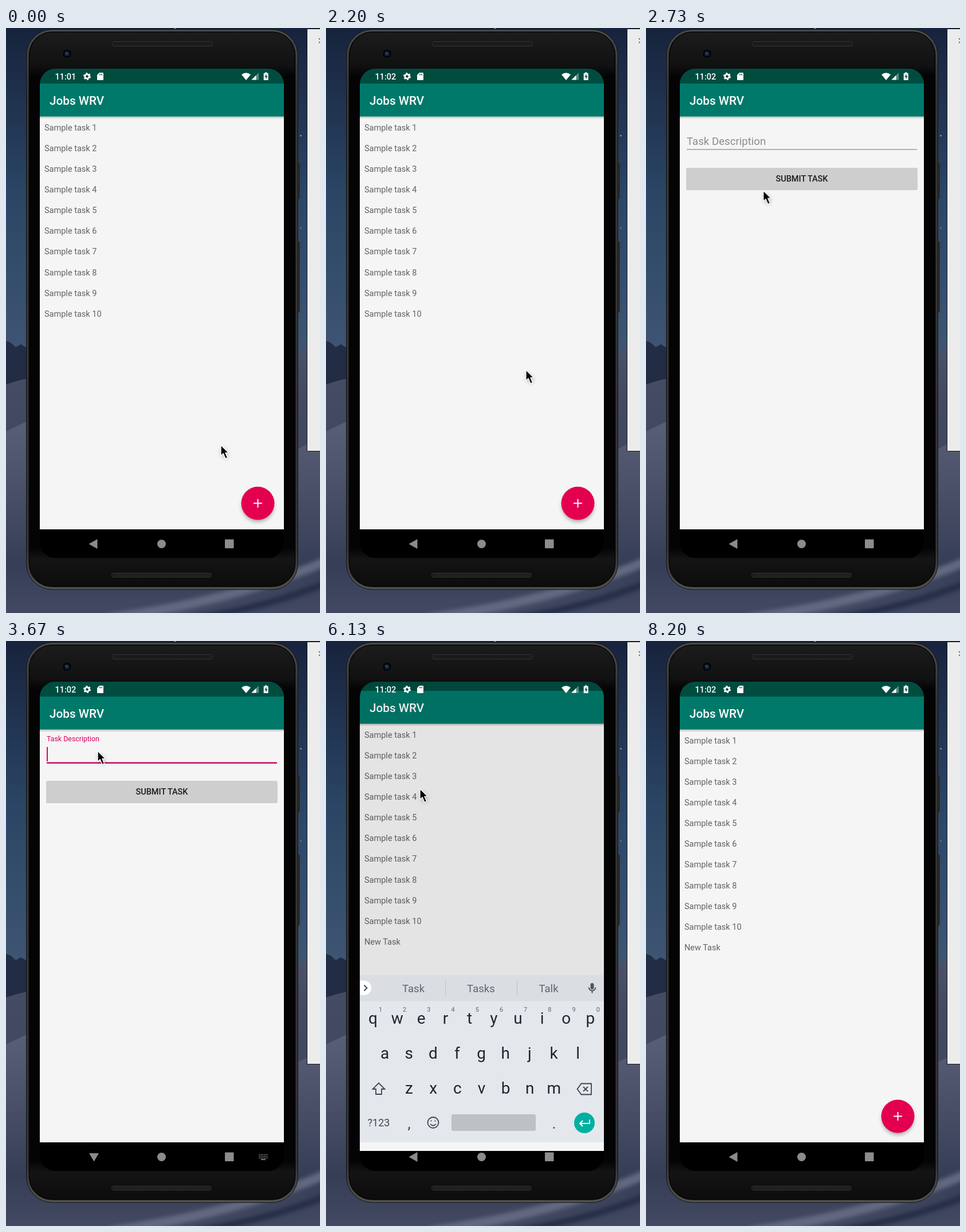
An HTML page for the animation above (8.54 s loop, 548 by 1021 pixels).

```html
<!DOCTYPE html>
<html lang="en">
<head>
<meta charset="utf-8">
<title>Task list demo</title>
<style>
  html, body { margin: 0; width: 100%; height: 100%; overflow: hidden; background: #26324f; }
  .stage { position: relative; width: 548px; height: 1021px; overflow: hidden; font-family: Roboto, sans-serif; }
  .layer, .stage svg { position: absolute; left: 0; top: 0; width: 548px; height: 1021px; }
  .screen { clip-path: inset(71px 63px 96px 59px round 27px); background: #000; }
  .above-nav { clip-path: inset(0 0 146px 0); }
  .medium { font-weight: 500; }
  .mid { text-anchor: middle; }
  .icon { fill: none; stroke: #3c474d; stroke-width: 1.8; }

  .anim { animation: 8540ms linear infinite; }
  .cursor { animation-name: cursor; }
  .list { animation-name: list; animation-timing-function: step-end; }
  .dim { animation-name: dim; animation-timing-function: step-end; }
  .form { animation-name: form; animation-timing-function: step-end; }
  .keyboard { animation-name: keyboard; }
  .ime-on { animation-name: ime-on; animation-timing-function: step-end; }
  .ime-off { animation-name: ime-off; animation-timing-function: step-end; }
  .label { animation-name: label; }
  .focus { animation-name: focus; }
  .press { animation-name: press; }
  .tap { animation-name: tap; }

  @keyframes cursor {
    0%, 8.548% { transform: translate(375px, 728px); animation-timing-function: ease-in-out; }
    15.574%, 20.492% { transform: translate(438px, 813px); animation-timing-function: ease-in; }
    27.283%, 28.091% { transform: translate(303px, 485.5px); animation-timing-function: ease-out; }
    35.83%, 60.07% { transform: translate(160px, 192px); animation-timing-function: ease-in-out; }
    64.754%, 81.967% { transform: translate(164px, 258px); opacity: 1; animation-timing-function: ease-in; }
    87.46% { transform: translate(479px, 72px); opacity: 1; }
    87.47%, 100% { transform: translate(479px, 72px); opacity: 0; }
  }
  @keyframes list {
    0% { transform: none; }
    27.283% { transform: translateY(-7.3px); }
    28.103% { transform: translateY(-15px); }
    28.923% { transform: translateY(-17px); }
    71.78% { transform: translateY(-10px); }
    72.6% { transform: translateY(-3px); }
    73.42% { transform: translateY(-1px); }
    74.24%, 100% { transform: none; }
  }
  @keyframes dim {
    0% { opacity: 0; }
    27.283% { opacity: .12; }
    71.78% { opacity: .07; }
    72.6%, 100% { opacity: 0; }
  }
  @keyframes form {
    0% { transform: translateY(35px); clip-path: inset(1021px 0 0 0); }
    27.283% { transform: translateY(20px); clip-path: inset(184px 0 0 0); }
    28.103% { transform: translateY(4.5px); clip-path: inset(76px 0 0 0); }
    28.923% { transform: translateY(1.5px); clip-path: inset(0 0 0 0); }
    30% { transform: none; clip-path: inset(0 0 0 0); }
    71.78% { transform: translateY(15px); clip-path: inset(640px 0 0 0); }
    72.6%, 100% { transform: translateY(35px); clip-path: inset(1021px 0 0 0); }
  }
  @keyframes keyboard {
    0%, 43.677% { transform: translateY(29px); opacity: 0; animation-timing-function: ease-out; }
    46.25%, 71.78% { transform: none; opacity: 1; animation-timing-function: ease-in; }
    73.536%, 100% { transform: translateY(29px); opacity: 0; }
  }
  @keyframes ime-on { 0% { opacity: 0; } 41.33% { opacity: 1; } 71.78%, 100% { opacity: 0; } }
  @keyframes ime-off { 0% { opacity: 1; } 41.33% { opacity: 0; } 71.78%, 100% { opacity: 1; } }
  @keyframes label {
    0%, 39% { transform: translate(71px, 203.5px) scale(1); fill: #8c8c8c; animation-timing-function: ease-out; }
    41%, 100% { transform: translate(71px, 174.5px) scale(.665); fill: #dc0066; }
  }
  @keyframes focus { 0%, 39% { opacity: 0; } 41%, 100% { opacity: 1; } }
  @keyframes press { 0%, 66.3% { opacity: 0; } 68% { opacity: .13; } 71%, 100% { opacity: 0; } }
  @keyframes tap { 0%, 18.5% { opacity: 0; } 20% { opacity: .18; } 23.5%, 100% { opacity: 0; } }
</style>
</head>
<body>
<div class="stage">
  <!-- wallpaper, side window and phone body -->
  <svg viewBox="0 0 548 1021">
    <defs>
      <linearGradient id="sky" x2="0" y2="1">
        <stop offset="0" stop-color="#17233d"/><stop offset=".45" stop-color="#2b4565"/>
        <stop offset="1" stop-color="#435a76"/>
      </linearGradient>
      <linearGradient id="dune" x2="0" y2="1">
        <stop offset="0" stop-color="#4a5269"/><stop offset=".2" stop-color="#434a61"/>
        <stop offset="1" stop-color="#3a4159"/>
      </linearGradient>
      <linearGradient id="ridge" x2="0" y2="1">
        <stop offset="0" stop-color="#5a6078"/><stop offset=".35" stop-color="#4b5168"/>
        <stop offset=".75" stop-color="#363e57"/><stop offset="1" stop-color="#424961"/>
      </linearGradient>
      <linearGradient id="rim" x2="0" y2="1">
        <stop offset="0" stop-color="#4b4b4a"/><stop offset=".1" stop-color="#2e2f2e"/>
        <stop offset=".93" stop-color="#2a2b2b"/><stop offset="1" stop-color="#555654"/>
      </linearGradient>
      <linearGradient id="body" x2="0" y2="1">
        <stop offset="0" stop-color="#1c1c1c"/><stop offset=".06" stop-color="#111"/>
        <stop offset=".08" stop-color="#040404"/><stop offset=".93" stop-color="#040404"/>
        <stop offset=".95" stop-color="#141414"/><stop offset="1" stop-color="#0c0c0c"/>
      </linearGradient>
      <linearGradient id="shade" x2="0" y2="1">
        <stop offset="0" stop-opacity=".22"/><stop offset="1" stop-opacity="0"/>
      </linearGradient>
      <filter id="soft" x="-50%" y="-50%" width="200%" height="200%"><feGaussianBlur stdDeviation="3.5"/></filter>
      <symbol id="chrome" viewBox="0 0 548 1021">
        <path fill="#f5f5f5" d="M59 71h426v804H59z"/>
        <path fill="#004d40" d="M59 71h426v26.5H59z"/>
        <path fill="#00796b" d="M59 97h426v57.5H59z"/>
        <path fill="url(#shade)" d="M59 154.5h426v4.5H59z"/>
        <text class="medium" x="76" y="133.5" font-size="20.7" fill="#fff">Jobs WRV</text>
      </symbol>
    </defs>
    <path fill="url(#sky)" d="M0 0h548v640H0z"/>
    <path fill="#222c45" d="M0 546l8 3 9 8 9-5 10 6 14 8v60H0z"/>
    <path fill="url(#dune)" d="M0 622Q30 612 60 608L505 568Q520 555 548 545V1021H0z"/>
    <path fill="url(#ridge)" d="M0 704Q30 690 60 675L500 740 548 715V1021H0z"/>
    <g fill="none" filter="url(#soft)">
      <path stroke="#626980" stroke-width="16" d="M180 1030Q400 1000 560 930"/>
      <path stroke="#272e46" stroke-width="12" d="M330 1030Q460 1010 560 968"/>
    </g>
    <g fill="#dfe5f0"><circle cx="514.5" cy="188" r="1"/><circle cx="514.5" cy="349" r=".7"/><circle cx="295" cy="0" r="1.2"/></g>

    <path fill="#ececec" stroke="#171a20" d="M525.5 1.5h26v737h-26z"/>
    <path fill="none" stroke="#555" stroke-width="1.3" d="M546 18l8 8m-8 0l8-8"/>

    <g fill="#333" stroke="#191919">
      <rect x="507" y="236" width="5" height="62" rx="1.5"/>
      <rect x="507" y="373" width="5" height="123" rx="1.5"/>
    </g>
    <rect x="35.7" y="2.500" width="473.600" height="977.500" rx="45" fill="url(#rim)" stroke="#121212"/>
    <rect x="37.7" y="4.500" width="469.600" height="973.500" rx="43" fill="none" stroke="#4a4a48" stroke-width=".8"/>
    <rect x="40.500" y="7" width="464" height="968" rx="40" fill="url(#body)" stroke="#060606" stroke-width="1.5"/>
    <g fill="#1b1b1b" stroke="#343434">
      <rect x="185" y="23.500" width="175.500" height="8" rx="3.500"/>
      <rect x="184.500" y="951.500" width="174" height="7" rx="3"/>
    </g>
    <path stroke="#2b2b2b" stroke-width="3" stroke-dasharray="1 1" d="M189 955h166"/>
    <circle cx="106.500" cy="45" r="8.500" fill="#060709" stroke="#202124"/>
    <circle cx="106.500" cy="45" r="4" fill="#17234a"/>
    <circle cx="105.500" cy="44" r="1.300" fill="#52658f"/>
  </svg>

  <div class="layer screen">
    <svg viewBox="0 0 548 1021" fill="#8c8c8c">
      <path class="anim ime-off" d="M159.500 892v17l-15-8.500z"/>
      <path class="anim ime-on" d="M145 894h17l-8.500 14.500z"/>
      <circle cx="271.500" cy="900.500" r="7.500"/>
      <rect x="382" y="892.500" width="15.500" height="15.500" rx="1"/>
      <g class="anim ime-on" fill="none" stroke="#8c8c8c" stroke-width="1.700">
        <path stroke-dasharray="1.700 1.200" d="M441.500 896.500h15.500M441.500 899.500h15.500M441.500 902.500h15.500"/>
        <path d="M445 905h8"/>
      </g>
    </svg>

    <div class="layer anim list">
      <svg viewBox="0 0 548 1021">
        <use href="#chrome" width="548" height="1021"/>
        <g id="rows" font-size="14.500" fill="#636363"></g>
        <circle cx="439.500" cy="834" r="27.500" opacity=".34" filter="url(#soft)"/>
        <circle cx="439.500" cy="829.500" r="29" fill="#e40050"/>
        <circle class="anim tap" cx="439.500" cy="829.500" r="29" fill="#fff"/>
        <path stroke="#fff" stroke-width="2" d="M432 829.500h15M439.500 822v15"/>
      </svg>
    </div>
    <svg class="anim dim" viewBox="0 0 548 1021"><path d="M59 71h426v804H59z"/></svg>

    <div class="layer anim form">
      <svg viewBox="0 0 548 1021">
        <use href="#chrome" width="548" height="1021"/>
        <text class="anim label" font-size="18.650">Task Description</text>
        <path fill="#707070" d="M71 211.500h402v1H71z"/>
        <path class="anim focus" fill="#e0006a" d="M71 211.800h402v2.200H71z"/>
        <text id="entry" x="71" y="204" font-size="18.650" fill="#1f1f1f" style="white-space:pre"><tspan id="done"></tspan><tspan id="word" style="text-decoration:underline 1px;text-underline-offset:3px"></tspan></text>
        <rect id="caret" y="185" width="2" height="25" fill="#e0006a"/>
        <rect x="70" y="245" width="404" height="38" rx="2" opacity=".16"/>
        <rect x="70.500" y="244" width="403" height="37" rx="2" fill="#cecece"/>
        <rect class="anim press" x="70.500" y="244" width="403" height="37" rx="2"/>
        <text class="medium mid" x="272" y="268" font-size="14.500" fill="#1c1c1c">SUBMIT TASK</text>
      </svg>
    </div>

    <div class="layer above-nav">
      <svg class="anim keyboard" viewBox="0 0 548 1021">
        <path fill="#e4e8ed" d="M59 583h426v292H59z"/>
        <path fill="#dadee3" d="M59 583h426v45.500H59z"/>
        <path fill="#fff" d="M59 592.500h7.500a12.700 12.700 0 0 1 0 25.400H59z"/>
        <path class="icon" stroke-width="2" d="M66.500 600.500l5 5-5 5"/>
        <path stroke="#bcc2c7" d="M208.500 593v26M333.500 593v26"/>
        <g id="hints" class="mid" font-size="18.600" fill="#5d676d"></g>
        <rect x="461.500" y="597" width="6" height="11" rx="3" fill="#4b565c"/>
        <path class="icon" stroke-width="1.600" d="M458.700 604.500a5.800 5.800 0 0 0 11.600 0M464.500 610.500v4"/>
        <g id="keys" class="mid" font-size="28" fill="#1d272c"></g>
        <g id="digits" class="mid" font-size="11" fill="#5d676d"></g>
        <path class="icon" d="M92 771.500l10.500 10.500h-5.500v9h-10v-9h-5.500z"/>
        <path class="icon" d="M438.500 782l7-9.500h17.500v19h-17.500zM449 778l8 8m0-8l-8 8"/>
        <g class="mid" fill="#3c474d">
          <text x="92" y="847" font-size="18">?123</text>
          <text x="145" y="851" font-size="26">,</text>
          <text x="398" y="851" font-size="26">.</text>
        </g>
        <circle class="icon" cx="187" cy="840.500" r="9.500"/>
        <path class="icon" d="M182 843q5 5.500 10 0M183.500 836.500v2M190.500 836.500v2"/>
        <rect x="219" y="826" width="147" height="29" rx="3" fill="#bdc1c6"/>
        <circle cx="451" cy="841" r="18" fill="#00b09f"/>
        <path fill="none" stroke="#fff" stroke-width="2" d="M460 835.500v6.500h-17m5-5l-5 5 5 5"/>
      </svg>
    </div>

    <svg viewBox="0 0 548 1021" fill="#fff">
      <text id="clock" class="medium" x="85.500" y="90" font-size="14.500">11:01</text>
      <g fill="none" stroke="#fff">
        <circle cx="141.500" cy="84.500" r="3.700" stroke-width="2.800"/>
        <circle cx="141.500" cy="84.500" r="5.500" stroke-width="2" stroke-dasharray="2.880 2.880"/>
      </g>
      <path d="M163 78h6q1 0 1 1v11q0 1-1 1h-9q-1 0-1-1v-8z"/>
      <path stroke="#004d40" d="M163.500 80v2.500M165.500 80v2.500M167.500 80v2.500"/>
      <path d="M411 81.300Q419 75 427 81.300L419 91z"/>
      <path opacity=".35" d="M441 78v12.500h-12.500z"/>
      <path d="M436.500 82.500v8h-8z"/>
      <path d="M451.700 77.500h4v1.500h2v12h-8v-12h2z"/>
      <path fill="#004d40" d="M454.500 80l-3 5.500h2v4l3-5.500h-2z"/>
    </svg>
  </div>

  <svg viewBox="0 0 548 1021">
    <g class="anim cursor">
      <path opacity=".3" filter="url(#soft)" d="M1 3v18l4-4 4 8 3-2-3-7h6z"/>
      <path stroke="#fff" stroke-width="1.300" stroke-linejoin="round" d="M0 0V18.500L4.200 14.700 8 23.500 11.600 22 7.900 13.300H13.400Z"/>
    </g>
  </svg>
</div>

<script>
  const LOOP = 8540;
  const ENTRY = "New Task";
  const FOCUS_AT = 3400, SUBMIT_AT = 6100, CLOCK_AT = 1930;
  const keyTimes = [4170, 4270, 4390, 4500, 4610, 4720, 4820, 4930];
  const byId = id => document.getElementById(id);

  function addText(parent, x, y, content) {
    const node = document.createElementNS("http://www.w3.org/2000/svg", "text");
    node.setAttribute("x", x);
    node.setAttribute("y", y);
    node.textContent = content;
    return byId(parent).appendChild(node);
  }

  for (let i = 0; i < 10; i++) addText("rows", 67, 178.6 + i * 36.13, `Sample task ${i + 1}`);
  const newRow = addText("rows", 67, 178.6 + 361.3, ENTRY);

  const keyRows = [["qwertyuiop", 82, 668], ["asdfghjkl", 102.5, 728.5], ["zxcvbnm", 145, 790]];
  for (const [letters, x, y] of keyRows)
    [...letters].forEach((letter, i) => addText("keys", x + i * 42.15, y, letter));
  [..."1234567890"].forEach((digit, i) => addText("digits", 95 + i * 42.2, 647, digit));
  const hints = [152.5, 270.5, 388.5].map(x => addText("hints", x, 612.5, ""));

  function suggestions(word) {
    if (!word) return ["I", "The", "This"];
    return word[0] === "N" ? ["New", "News", "Never"] : ["Task", "Tasks", "Talk"];
  }

  function setText(node, value) {
    if (node.textContent !== value) node.textContent = value;
  }

  function draw() {
    const t = performance.now() % LOOP;
    const count = keyTimes.filter(time => time <= t).length;
    const typed = ENTRY.slice(0, count);
    const split = typed.lastIndexOf(" ") + 1;
    const word = typed.slice(split);
    const lastEdit = count ? keyTimes[count - 1] : FOCUS_AT;

    setText(byId("clock"), t < CLOCK_AT ? "11:01" : "11:02");
    setText(byId("done"), typed.slice(0, split));
    setText(byId("word"), word);
    suggestions(word).forEach((hint, i) => setText(hints[i], hint));
    newRow.style.opacity = t < SUBMIT_AT ? 0 : 1;

    const caret = byId("caret");
    caret.setAttribute("x", 71 + byId("entry").getComputedTextLength());
    caret.style.opacity = t >= FOCUS_AT && (t - lastEdit) % 1000 < 500 ? 1 : 0;
    requestAnimationFrame(draw);
  }
  draw();
</script>
</body>
</html>
```
